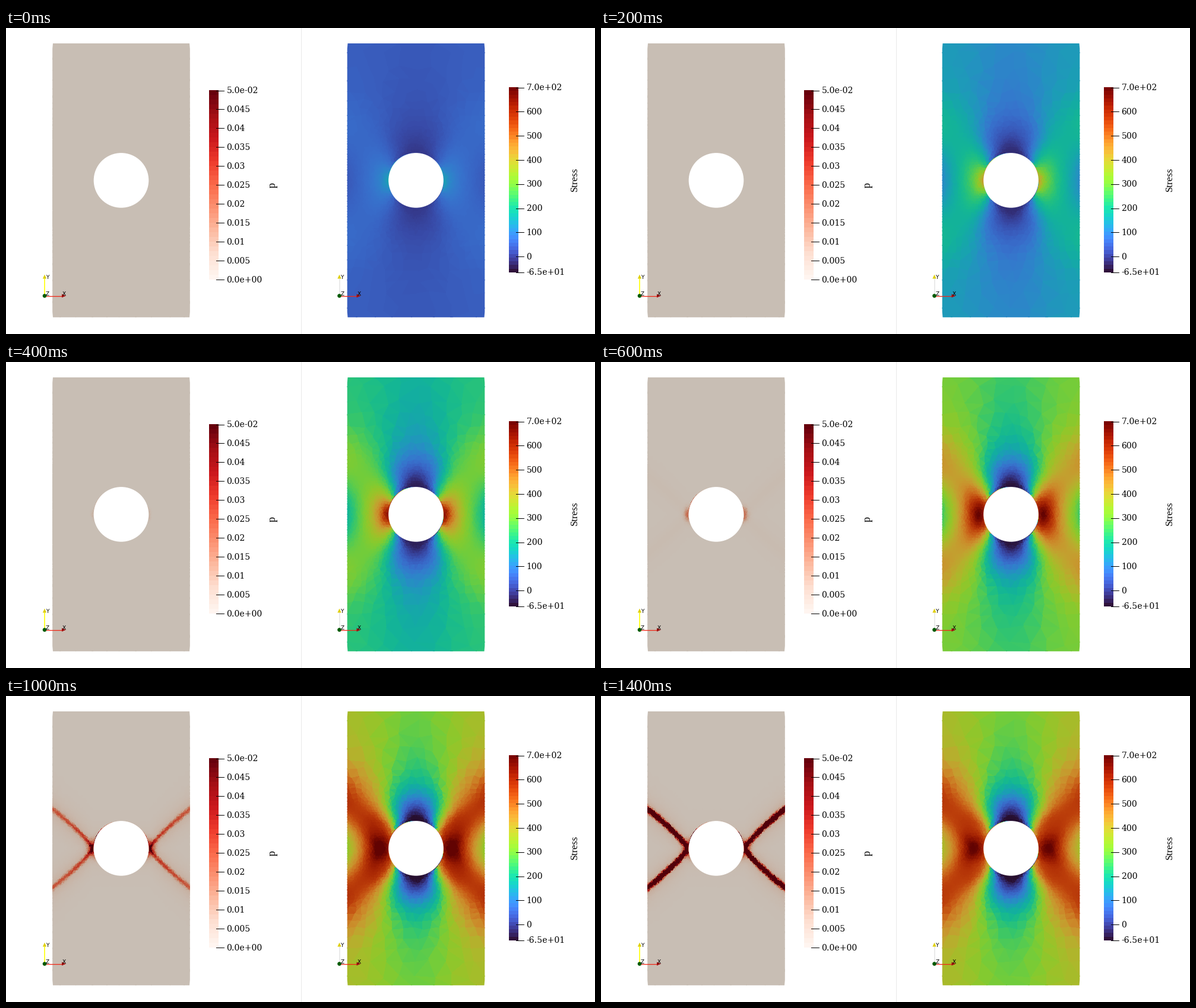
Recreate the animation shown at these times as a matplotlib script. Size 992 px wide and 517 px high, loop 1.5 s.

```python
import numpy as np
import matplotlib
import matplotlib.pyplot as plt
from matplotlib.animation import FuncAnimation
from matplotlib.colors import ListedColormap
from matplotlib.patches import Circle, Polygon
from matplotlib.tri import Triangulation

W, H, DPI = 992, 517, 64
FRAMES, INTERVAL = 15, 100
PX = 72 / DPI                      # points per pixel
HALF_W, HALF_H, HOLE = 115.8, 231.4, 46.3
CY = 257.4
S_MIN, S_MAX = -65, 700

fig = plt.figure(figsize=(W / DPI, H / DPI), dpi=DPI, facecolor="white")
ax = fig.add_axes([0, 0, 1, 1])


def shaded(name, factor):
    """Colour map dimmed the way a lit surface shows it."""
    rgb = matplotlib.colormaps[name](np.linspace(0, 1, 256))[:, :3]
    return ListedColormap(rgb * np.array(factor))


def plate_mesh(size, growth, seed):
    """Triangles of the plate, fine around the hole, coarse at the ends."""
    rng = np.random.default_rng(seed)
    rows, y = [0.0], 0.0
    while True:
        h = size + growth * max(y - 72, 0)
        if y + 1.4 * h > HALF_H:
            break
        y += h
        rows.append(y)
    rows.append(HALF_H)
    pts = []
    for i, y in enumerate(rows):
        h = size + growth * max(y - 72, 0)
        for sign in ((1, -1) if y else (1,)):
            n = max(4, round(2 * HALF_W / h))
            xs = np.linspace(-HALF_W, HALF_W, n + 1)
            if i % 2:
                xs = np.r_[xs[0], (xs[1:] + xs[:-1]) / 2, xs[-1]]
            ys = np.full(len(xs), sign * y)
            xs[1:-1] += rng.uniform(-0.22, 0.22, len(xs) - 2) * h
            if 0 < y < HALF_H:
                ys[1:-1] += rng.uniform(-0.22, 0.22, len(xs) - 2) * h
            keep = np.hypot(xs, ys) > HOLE + 0.5 * size
            pts.append(np.c_[xs, ys][keep])
    a = np.linspace(0, 2 * np.pi, int(2 * np.pi * HOLE / size), endpoint=False)
    pts.append(HOLE * np.c_[np.cos(a), np.sin(a)])
    x, y = np.vstack(pts).T
    tri = Triangulation(x, y)
    return tri, x[tri.triangles].mean(1), y[tri.triangles].mean(1)


def gauss(v, width):
    return np.exp(-(v / width) ** 2)


def stress_parts(x, y):
    """Elastic stress for one load step, yield limit and late flow terms."""
    X, Y = np.abs(x) / HOLE, np.abs(y) / HOLE
    r = np.maximum(np.hypot(X, Y), 1)
    phi = np.arctan2(X, Y)
    c2, c4 = np.cos(2 * phi), np.cos(4 * phi)
    hole = 1 - (1.5 * c2 + c4) / r**2 + 1.5 * c4 / r**4
    edge = np.exp((X - 2.5) / 0.35) * gauss(Y, 1.1)
    lobe = (X / 2.5) ** 2 * gauss(Y - 2.1, 1.1)
    ligament = gauss(r - 1.2, 0.72) * np.sin(phi) ** 2
    axis = gauss(X, 1.3) * np.cos(phi) ** 2
    shoulder = gauss(X - 0.8, 0.45) * gauss(Y - 1.3, 0.9)
    elastic = (46 * hole - 18 * edge + 13 * lobe + 18 * ligament
               - 6 * axis - 12 * shoulder)
    rise = 1 - np.exp(-(r - 1) * HOLE / 14)
    limit = 640 * (1 - np.cos(phi) ** 2 / r**4) + 170 * rise * gauss(Y, 0.42)
    spoke = (np.clip((X - 0.9) / 0.6, 0, 1)
             * gauss(Y - 0.72 * X + 0.27, 0.3 + 0.2 * X))
    return elastic, np.maximum(limit, 60), edge, spoke


def soft_min(v, cap, m):
    return v * (1 + (np.maximum(v, 0) / cap) ** m) ** (-1 / m)


def stress(n, parts):
    elastic, limit, edge, spoke = parts
    load = soft_min(n + 1.0, 8.35, 8)
    flow = np.clip((n - 5) / 4, 0, 1)
    spread = np.clip((n - 6) / 8, 0, 1)
    cap = limit - 40 * np.clip((n - 10) / 4, 0, 1)
    return soft_min(load * elastic + 100 * flow * spoke + 70 * spread * edge,
                    cap, 12)


def plastic_strain(n, x, y):
    """Plastic strain as a share of the colour range."""
    ax_, ay = np.abs(x), np.abs(y)
    d = np.maximum(ax_ - 48, 0)
    dist = np.abs(ay - 2.1 * d**0.82) / 1.42
    gap = np.maximum(np.hypot(x, y) - HOLE, 0)
    p = np.zeros_like(x)
    if n >= 4:
        core = min(0.14 + 0.15 * (n - 4), 0.75)
        reach = min(3.5 + 1.7 * (n - 4), 9)
        tall = min(9 + 1.5 * (n - 4), 14)
        p += core * gauss(gap, reach) * gauss(y, tall) * (ax_ > 20)
    halo = np.clip((n - 5) / 4, 0, 1)
    p += halo * (0.055 * gauss(dist, 13) + 0.03 * gauss(dist, 32))
    if n > 8:
        band = 0.45 * ((n - 8) / 2) ** 1.6
        p += band * (1.15 - 0.005 * d) * gauss(dist, 3.3)
        p += 0.12 * min(band, 1) * np.exp(-dist / 7)
    return p


def add_plate(cx, mesh, cmap, lo, hi):
    tri, _, _ = mesh
    moved = Triangulation(tri.x + cx, tri.y + CY, tri.triangles)
    field = ax.tripcolor(moved, np.zeros(len(tri.triangles)), cmap=cmap,
                         vmin=lo, vmax=hi, shading="flat")
    corner = [(HALF_W - 0.8, HALF_H), (HALF_W, HALF_H - 9)]
    right = corner + [(x, -y) for x, y in corner[::-1]]
    outline = right + [(-x, y) for x, y in right[::-1]]
    clip = Polygon([(cx + x, CY + y) for x, y in outline], fc="none", ec="none")
    ax.add_patch(clip)
    field.set_clip_path(clip)
    ax.add_patch(Circle((cx, CY), HOLE, fc="white", ec="none", zorder=3))
    return field


def label(x, y, s, px, family="DejaVu Serif", **kw):
    ax.text(x, y, s, fontsize=px * PX, family=family, color="black", zorder=6, **kw)


def add_bar(x, top, bottom, cmap, bands, ticks):
    ramp = matplotlib.colormaps[cmap](np.linspace(0, 1, bands))[:, None, :3]
    ax.imshow(ramp, extent=(x, x + 16, bottom, top), origin="lower",
              aspect="auto", interpolation="nearest")
    for share, text in ticks:
        y = bottom + (top - bottom) * share
        ax.plot([x + 12, x + 25], [y, y], color="black", lw=PX)
        label(x + 29.5, y + 4.7, text, 14)


def add_triad(x, y, stem):
    ax.plot([x, x], [y, y - 29], color=stem, lw=1.6 * PX, zorder=4)
    ax.plot([x, x + 30], [y, y], color="#f02818", lw=1.3 * PX, zorder=4)
    ax.add_patch(Polygon([(x, y - 36), (x - 3.2, y - 29), (x + 3.2, y - 29)],
                         fc="#e0d010", ec="none", zorder=5))
    ax.add_patch(Polygon([(x + 36, y), (x + 29, y - 3), (x + 29, y + 3)],
                         fc="#a01010", ec="none", zorder=5))
    ax.add_patch(Circle((x, y), 3.3, fc="#005a00", ec="none", zorder=5))
    for dx, dy, s in ((4.5, -28.7, "Y"), (33, -0.7, "X"), (5, -0.7, "Z")):
        label(x + dx, y + dy, s, 9, "DejaVu Sans", ha="center")


strain_mesh = plate_mesh(2.4, 0.15, 3)
stress_mesh = plate_mesh(4.4, 0.18, 8)
strain_field = add_plate(194, strain_mesh,
                         shaded("Reds", (0.784, 0.775, 0.75)), 0, 1)
stress_field = add_plate(690.5, stress_mesh,
                         shaded("turbo", (0.8, 0.8, 0.8)), S_MIN, S_MAX)
parts = stress_parts(*stress_mesh[1:])

strain_ticks = [(0, "0.0e+00"), (1, "5.0e-02")]
strain_ticks += [(i / 10, f"{i * 0.005:g}") for i in range(1, 10)]
stress_ticks = [(0, "-6.5e+01"), (1, "7.0e+02")]
stress_ticks += [((v - S_MIN) / (S_MAX - S_MIN), str(v)) for v in range(0, 700, 100)]
add_bar(342, 105.5, 425.3, "Reds", 40, strain_ticks)
add_bar(847, 100.5, 412.7, "turbo", 50, stress_ticks)

title = dict(family="Liberation Serif", rotation=90, ha="center", va="center")
label(449, 265, "p", 18, **title)
label(957.5, 256, "Stress", 17, **title)

ax.plot([496.5, 496.5], [0, H], color="#e8e8e8", lw=PX)
add_triad(65, 452.5, "#ffff00")
add_triad(561.5, 452.5, "#e6e6e6")

ax.set_xlim(0, W)
ax.set_ylim(H, 0)
ax.set_aspect("auto")
ax.axis("off")


def update(n):
    strain_field.set_array(plastic_strain(n, *strain_mesh[1:]))
    stress_field.set_array(stress(n, parts))
    return strain_field, stress_field


anim = FuncAnimation(fig, update, frames=FRAMES, interval=INTERVAL, repeat=True)
plt.show()
```
